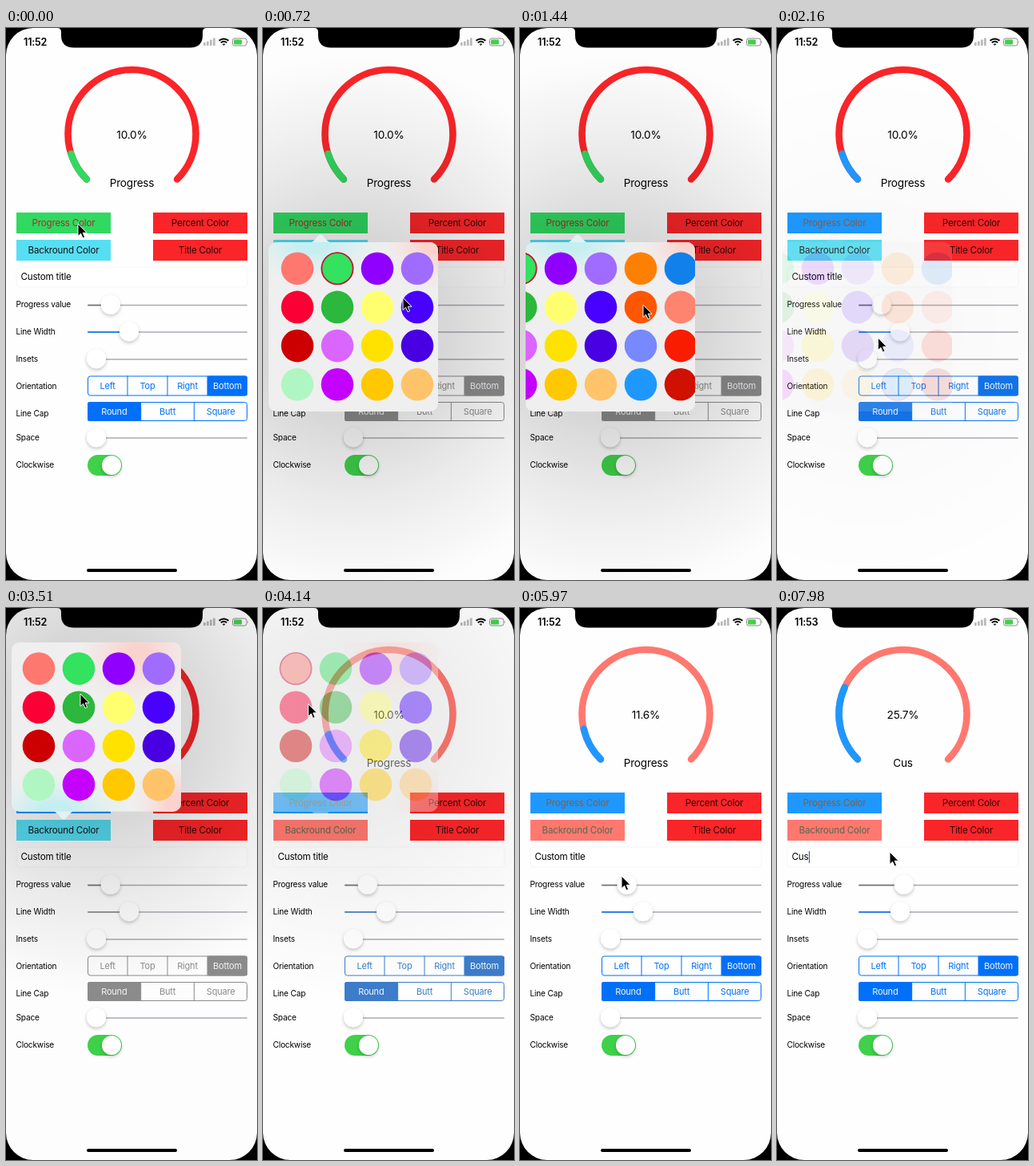
These frames come from a looping animation (314x688 px, 8000 ms). An HTML page:

```html
<!DOCTYPE html>
<html lang="en">
<head>
<meta charset="utf-8">
<title>Progress ring settings</title>
<style>
  html, body { margin: 0; width: 100%; height: 100%; overflow: hidden; background: #000; }
  svg { display: block; width: 314px; height: 688px; font-family: Inter, Roboto, sans-serif; user-select: none; }
  .title { font-size: 13.6px; letter-spacing: -.2px; }
  .body { font-size: 11.6px; letter-spacing: -.2px; }
  .label { font-size: 10.1px; letter-spacing: -.17px; }
  .seg { font-size: 11px; letter-spacing: -.2px; }
  .mid { text-anchor: middle; }
</style>
</head>
<body>
<svg id="stage" viewBox="0 0 314 688">
  <defs>
    <radialGradient id="shade" gradientUnits="userSpaceOnUse" cx="113" cy="0" r="335">
      <stop offset="0" stop-color="#d2d2d3"/>
      <stop offset=".35" stop-color="#d8d8d9"/>
      <stop offset=".65" stop-color="#ececec"/>
      <stop offset="1" stop-color="#fefefe"/>
    </radialGradient>
    <radialGradient id="cool"><stop offset=".2" stop-color="#c4eef0"/><stop offset="1" stop-color="#e2f0f0" stop-opacity="0"/></radialGradient>
    <radialGradient id="pink"><stop offset=".2" stop-color="#fbd3ce"/><stop offset="1" stop-color="#f4e2e0" stop-opacity="0"/></radialGradient>
    <filter id="drop" x="-50%" y="-50%" width="200%" height="200%">
      <feDropShadow dx="0" dy="2" stdDeviation="2" flood-color="#000" flood-opacity=".24"/>
    </filter>
    <clipPath id="card"><rect x="7" width="212" height="211" rx="10"/></clipPath>
  </defs>
  <rect width="314" height="688" fill="#fefefe"/>
  <g id="ring" fill="none" stroke-width="8.6" stroke-linecap="round">
    <path id="track"/><path id="fill"/>
  </g>
  <text id="percent" class="title mid" x="157.5" y="138"></text>
  <text id="title" class="title mid" x="157.5" y="198"></text>
  <g id="controls"></g>
  <text id="entry" class="body" x="18.5" y="314"></text>
  <rect id="caret" y="303" width="1" height="15" fill="#2a4a90"/>
  <g id="status">
    <text id="clock" x="22" y="22" font-size="12.6" font-weight="600" letter-spacing="-.2"></text>
    <g fill="#b9b9b9"><rect x="247" y="18" width="2.7" height="4" rx=".6"/><rect x="251" y="16.5" width="2.7" height="5.5" rx=".6"/><rect x="255" y="14.5" width="2.7" height="7.5" rx=".6"/><rect x="259" y="12.5" width="2.7" height="9.5" rx=".6"/></g>
    <g fill="none" stroke="#000" stroke-width="2"><path d="M266.5 15.8q6-4.6 12 0M268.8 18.2q3.7-2.8 7.4 0"/><path d="M271.2 20.1l1.3 1.4 1.3-1.4z" stroke-width="1"/></g>
    <rect x="283.5" y="13" width="17.5" height="9" rx="2.6" fill="none" stroke="#8c8c8c"/>
    <rect x="285" y="14.5" width="10" height="6" rx="1.3" fill="#3fd14a"/>
    <path d="M302.3 15.8q1.6 1.7 0 3.4z" fill="#8c8c8c"/>
  </g>
  <rect id="dim" width="314" height="688" fill="url(#shade)" style="mix-blend-mode:multiply"/>
  <g id="popover">
    <path id="arrow" fill="#e4f1f2"/>
    <g clip-path="url(#card)">
      <rect x="7" width="212" height="211" fill="#efefef"/>
      <g id="tintBelow">
        <ellipse cx="62" cy="2" rx="95" ry="48" fill="url(#cool)"/>
        <ellipse cx="212" cy="2" rx="62" ry="60" fill="url(#pink)"/>
      </g>
      <g id="tintAbove">
        <ellipse cx="165" cy="15" rx="80" ry="62" fill="url(#pink)"/>
        <ellipse cx="212" cy="205" rx="55" ry="60" fill="url(#pink)"/>
        <ellipse cx="62" cy="210" rx="95" ry="50" fill="url(#cool)"/>
      </g>
      <g id="swatches"></g>
    </g>
  </g>
  <rect x="101" y="674" width="113" height="4" rx="2"/>
  <path d="M0 0H34A34 34 0 0 0 0 34ZM314 0H280A34 34 0 0 1 314 34ZM0 688H34A34 34 0 0 1 0 654ZM314 688H280A34 34 0 0 0 314 654Z"/>
  <path d="M64 0Q69 0 69 5V9Q69 24.5 85 24.5H230Q246 24.5 246 9V5Q246 0 251 0Z"/>
  <path id="pointer" d="M0 0V15.5L3.6 12.2L6 17.8L8.6 16.7L6.2 11.2H11Z" stroke="#fff" stroke-width="1" stroke-linejoin="round"/>
</svg>
<script>
const LOOP = 8000;
const $ = id => document.getElementById(id);
const GREEN = '#30da60', BLUE = '#1e98ff', RED = '#fa2528', CYAN = '#56dff4', SALMON = '#ff7870';
const TINT = [0, 112, 248], DULL = [140, 140, 140];

function add(parent, tag, attrs, text) {
  const el = document.createElementNS('http://www.w3.org/2000/svg', tag);
  for (const k in attrs) el.setAttribute(k, attrs[k]);
  if (text) el.textContent = text;
  return parent.appendChild(el);
}
const set = (id, attrs) => { for (const k in attrs) $(id).setAttribute(k, attrs[k]); };

const clamp = x => Math.min(1, Math.max(0, x));
const ease = x => { x = clamp(x); return x * x * (3 - 2 * x); };
const ramp = (t, a, b) => ease((t - a) / (b - a));

// Eased value of column `c` in rows of [time, ...values].
function track(keys, t, c = 1) {
  let i = 0;
  while (i < keys.length - 1 && t >= keys[i + 1][0]) i++;
  const a = keys[i], b = keys[Math.min(i + 1, keys.length - 1)];
  return a === b ? a[c] : a[c] + (b[c] - a[c]) * ramp(t, a[0], b[0]);
}

const CURSOR = [
  [0, 90, 244], [300, 92, 247], [720, 175, 336], [800, 175, 337], [1240, 83, 340], [1440, 154, 345],
  [1720, 151, 440], [1950, 151, 440], [2500, 76, 276], [2850, 78, 272], [3510, 93, 107], [3820, 42, 76],
  [4050, 44, 80], [4420, 127, 341], [4480, 127, 341], [4800, 202, 340], [4890, 199, 340], [5040, 142, 338],
  [5400, 131, 335], [5970, 127, 334], [6350, 152, 336], [6500, 152, 336], [6800, 141, 304]
];
const VALUE = [
  [0, 10], [4460, 10], [4800, 56], [4890, 54], [5040, 23],
  [5400, 13], [5800, 11.6], [5970, 11.6], [6350, 25.7]
];
const TYPED = [[7350, 'C'], [7600, 'Cu'], [7820, 'Cus']];

// Controls
const ui = $('controls');
function button(x, y, id, label) {
  add(ui, 'rect', { id, x, y, width: 118, height: 26, fill: RED });
  add(ui, 'text', { id: id + 'Text', class: 'body mid', x: x + 59, y: y + 17, fill: '#300808' }, label);
}
button(13, 230, 'fore', 'Progress Color');
button(184, 230, 'pct', 'Percent Color');
button(13, 264, 'back', 'Backround Color');
button(184, 264, 'head', 'Title Color');
add(ui, 'rect', { x: 13, y: 298, width: 289, height: 25, rx: 4, fill: '#fff', stroke: '#f3f3f3', 'stroke-width': .7 });

[['Progress value', 348], ['Line Width', 382], ['Insets', 416], ['Orientation', 450],
 ['Line Cap', 484], ['Space', 513.5], ['Clockwise', 547.5]]
  .forEach(([s, y]) => add(ui, 'text', { class: 'label', x: 12.5, y }, s));

const tinted = [];
const tint = (el, attr) => { tinted.push([el, attr]); return el; };

function slider(y, x, id) {
  add(ui, 'rect', { x: 102, y: y - .8, width: 200, height: 1.6, rx: .8, fill: '#a9a9b2' });
  const low = add(ui, 'rect', { id: id + 'Low', x: 102, y: y - .8, width: x - 102, height: 1.6, rx: .8, fill: '#707074' });
  if (id === 'width') tint(low, 'fill');
  add(ui, 'circle', { id, cx: x, cy: y - .7, r: 12, fill: '#fff', filter: 'url(#drop)' });
}
slider(345.5, 131, 'value');
slider(379, 154, 'width');
slider(413, 113, 'insets');
slider(511, 113, 'space');

function segments(y, h, labels, chosen) {
  const w = 200 / labels.length;
  tint(add(ui, 'rect', { x: 102 + w * chosen, y, width: w, height: h, rx: 2.5 }), 'fill');
  tint(add(ui, 'rect', { x: 102.5, y: y + .5, width: 199, height: h - 1, rx: 3, fill: 'none' }), 'stroke');
  labels.forEach((s, i) => {
    if (i) tint(add(ui, 'path', { d: `M${102 + w * i} ${y}v${h}` }), 'stroke');
    const el = add(ui, 'text', { class: 'seg mid', x: 102 + w * (i + .5), y: y + 16, fill: '#f4f6fa' }, s);
    if (i !== chosen) tint(el, 'fill');
  });
}
segments(433.5, 25, ['Left', 'Top', 'Right', 'Bottom'], 3);
segments(466, 24, ['Round', 'Butt', 'Square'], 0);

add(ui, 'rect', { x: 102, y: 532, width: 43, height: 26, rx: 13, fill: '#3fd14a' });
add(ui, 'circle', { cx: 132, cy: 545, r: 12, fill: '#fff', filter: 'url(#drop)' });

// Palette, column by column
const PALETTE = [
  [SALMON, '#fb0034', '#cc0000', '#b0f6c2'],
  ['#33e25f', '#2bb83c', '#da66ff', '#c400ff'],
  ['#9000ff', '#ffff70', '#ffe200', '#ffc800'],
  ['#a06cff', '#4800ff', '#4800e2', '#ffc46a'],
  ['#ff8000', '#ff5600', '#7888ff', BLUE],
  ['#1280ea', '#ff8470', '#fa1c00', '#d01000']
];
PALETTE.forEach((col, i) => col.forEach((fill, j) =>
  add($('swatches'), 'circle', { cx: 41 + 50 * i, cy: 32.7 + 48.2 * j, r: 20.3, fill })));
const mark = add($('swatches'), 'circle', { r: 19.6, fill: 'none', stroke: '#c8143c', 'stroke-width': 1.8 });

// The ring covers 270 degrees, opening downwards.
function arc(percent) {
  const at = deg => {
    const a = deg * Math.PI / 180;
    return `${157.5 + 80 * Math.cos(a)} ${132 + 80 * Math.sin(a)}`;
  };
  const sweep = 2.7 * percent;
  return `M${at(135)}A80 80 0 ${sweep > 180 ? 1 : 0} 1 ${at(135 + sweep)}`;
}

function popover(t) {
  const second = t > 2450;
  const y = second ? 42.8 : 267;
  const show = second
    ? ramp(t, 2720, 3050) * (1 - ramp(t, 3950, 4300))
    : ramp(t, 130, 480) * (1 - ramp(t, 1850, 2250));
  set('popover', { opacity: show, transform: `translate(0 ${y})` });
  set('dim', { opacity: show });
  set('shade', { cy: y + 105 });
  set('tintBelow', { opacity: second ? 0 : 1 });
  set('tintAbove', { opacity: second ? 1 : 0 });
  set('arrow', { d: second ? 'M58 210Q63 211 68 218Q72 223 76 218Q81 211 86 210Z' : 'M58 1Q63 0 68 -7Q72 -12 76 -7Q81 0 86 1Z' });

  const scroll = second ? 0 : track([[560, 0], [700, -2], [800, -2], [1260, 90]], t);
  set('swatches', { transform: `translate(${-scroll} 0)` });
  const [col, row] = second ? [0, 0] : t < 1760 ? [1, 0] : [4, 3];
  mark.setAttribute('cx', 41 + 50 * col);
  mark.setAttribute('cy', 32.7 + 48.2 * row);
  mark.setAttribute('opacity', second && t < 3880 ? 0 : 1);

  const rgb = TINT.map((c, i) => Math.round(c + (DULL[i] - c) * show));
  tinted.forEach(([el, attr]) => el.setAttribute(attr, `rgb(${rgb})`));
}

function update(t) {
  popover(t);

  const foreNew = t >= 1780, backNew = t >= 3900;
  set('fore', { fill: foreNew ? BLUE : GREEN });
  set('foreText', { fill: foreNew ? '#8f5a3a' : '#a82a38' });
  set('back', { fill: backNew ? SALMON : CYAN });
  set('backText', { fill: backNew ? '#57694a' : '#101414' });

  // The ring trails the slider slightly.
  const value = track(VALUE, t), knob = 113 + 1.78 * value;
  set('track', { d: arc(100), stroke: backNew ? SALMON : RED });
  set('fill', { d: arc(track(VALUE, t - 120)), stroke: foreNew ? BLUE : GREEN });
  set('value', { cx: knob });
  set('valueLow', { width: knob - 102 });
  $('percent').textContent = value.toFixed(1) + '%';

  const typed = TYPED.reduce((s, [at, text]) => t >= at ? text : s, '');
  $('title').textContent = typed || 'Progress';
  $('entry').textContent = typed || 'Custom title';
  set('caret', {
    x: 18.5 + (typed ? $('entry').getComputedTextLength() + .5 : -1),
    opacity: t >= 6900 ? 1 : 0
  });
  $('clock').textContent = t < 6500 ? '11:52' : '11:53';
  set('pointer', { transform: `translate(${track(CURSOR, t, 1)} ${track(CURSOR, t, 2)})` });
}

const start = performance.now();
function frame() {
  update((performance.now() - start) % LOOP);
  requestAnimationFrame(frame);
}
update(0);
requestAnimationFrame(frame);
</script>
</body>
</html>
```
